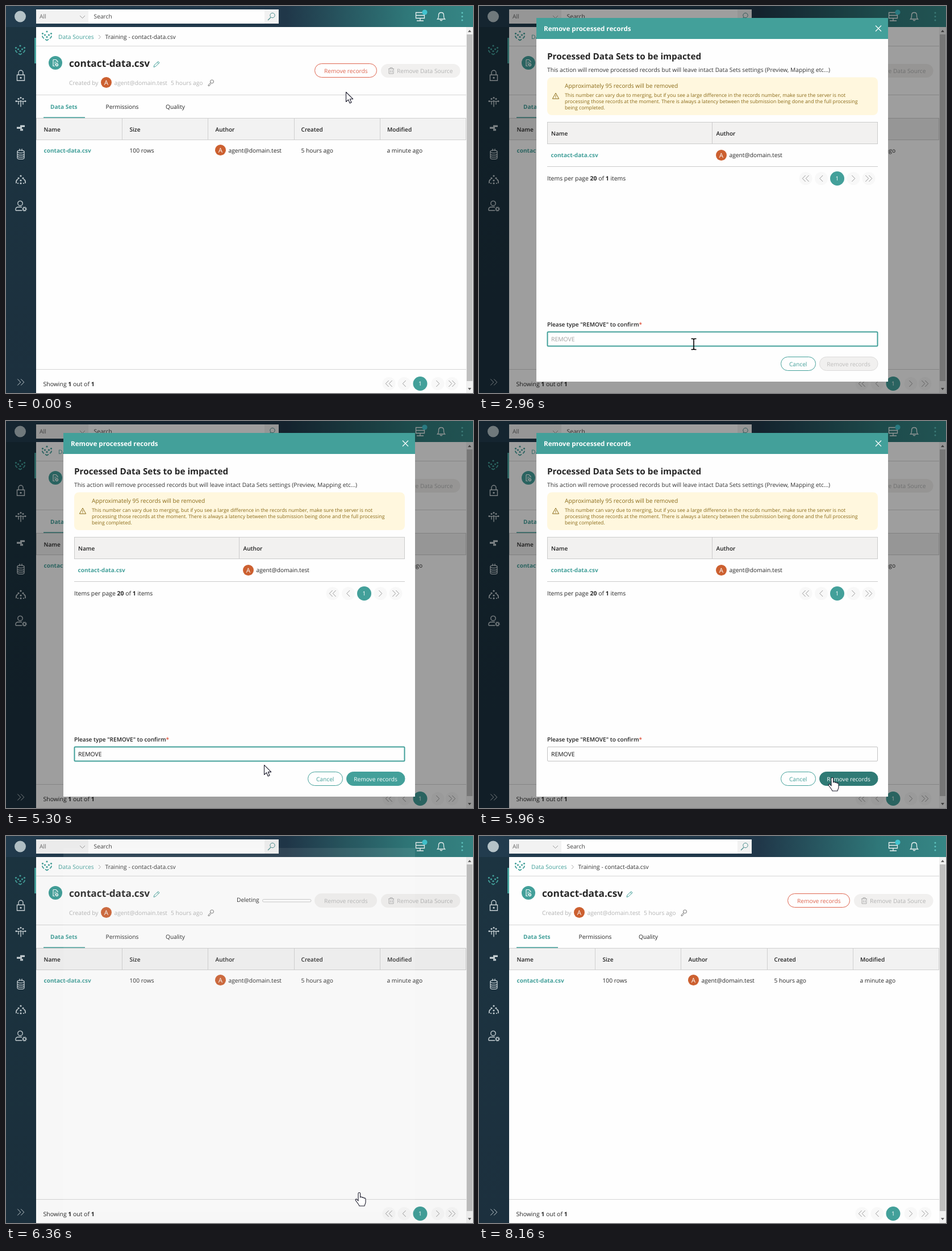
An HTML page for the animation above (8530 ms loop, 822 by 681 pixels).

```html
<!DOCTYPE html>
<html lang="en">
<head>
<meta charset="utf-8">
<title>Remove processed records</title>
<style>
  html, body { margin: 0; width: 100%; height: 100%; overflow: hidden; background: #fefefe; }
  svg { display: block; width: 100%; height: 100%; }
  text { font-family: "Open Sans", "Noto Sans", sans-serif; text-rendering: geometricPrecision; white-space: pre; }
</style>
</head>
<body>
<svg id="stage" viewBox="0 0 822 681" xmlns="http://www.w3.org/2000/svg"></svg>
<script>
const LOOP = 8530;
const TEAL = '#43a09a', INK = '#262626', GREY = '#b3b3b3', RED = '#de654f', RUST = '#cc6030', PALE = '#c3cdd1', OFF = '#f1f0ef';
const MAIL = 'agent@domain.test';

// Drawing helpers, each returning SVG markup
const text = (x, y, s, fill = INK, size = 10.25, weight = 400, more = '') =>
  `<text x="${x}" y="${y}" fill="${fill}" font-size="${size}" font-weight="${weight}" ${more}>${s}</text>`;
const semi = (x, y, s, more) => text(x, y, s, '#222', 10.1, 600, more);
const bold = (x, y, s, fill = INK, size = 10.1) => text(x, y, s, fill, size, 700);
const mid = (x, y, s, fill, more = '') => text(x, y, s, fill, 10.2, 400, 'text-anchor="middle" ' + more);
const rect = (x, y, w, h, fill, more = '') => `<rect x="${x}" y="${y}" width="${w}" height="${h}" fill="${fill}" ${more}/>`;
const line = (d, stroke = '#d6d6d6', w = 1, more = '') => `<path d="${d}" fill="none" stroke="${stroke}" stroke-width="${w}" ${more}/>`;
const dot = (x, y, r, fill, more = '') => `<circle cx="${x}" cy="${y}" r="${r}" fill="${fill}" ${more}/>`;
const at = (x, y, s) => `<g transform="translate(${x} ${y})">${s}</g>`;
const dots = (points, r, fill) => points.map(([x, y]) => dot(x, y, r, fill)).join('');
const chevron = (x, y, dir, count = 1, stroke = '#9a9a9a') =>
  Array.from({ length: count }, (_, i) => {
    const cx = x + (i - (count - 1) / 2) * 6;
    return line(`M${cx - 2.7 * dir} ${y - 5.5}l${5.4 * dir} 5.5l${-5.4 * dir} 5.5`, stroke);
  }).join('');
const avatar = (x, y) => dot(x, y, 9.5, RUST) + mid(x, y + 4.2, 'A', '#fff', 'style="font-size:11.5px"');
const pager = (x, y, [first, prev, next, last]) =>
  [first, prev, next, last].map(p => dot(p, y, 11.5, '#f8f8f8')).join('') +
  chevron(first, y, -1, 2) + chevron(prev, y, -1) + dot(x, y, 12.5, TEAL) +
  mid(x, y + 3.7, '1', '#fff') + chevron(next, y, 1) + chevron(last, y, 1, 2);
const strong = s => `<tspan font-weight="700">${s}</tspan>`;

// Icons, centred on the origin
const sourceIcon = dots([[0, -7], [-7.5, -3.5], [7.5, -3.5], [-3.5, -1], [3.5, -1], [0, 2.5]], 1.6, TEAL) +
  line('M-8 .5Q-8 3.5-5 5M8 .5Q8 3.5 5 5M-3 6.5L0 8.5 3 6.5', TEAL, 1.8);
const sideIcons = [
  sourceIcon,
  line('M-6.5-1.5h13v10h-13zM-4-1.5v-4a4 4 0 0 1 8 0v4', PALE, 1.4) + dot(0, 3.5, 1.6, PALE),
  line('M0-3V9M-8-1H8M-4-1V5M4-1V5', PALE, 1.4) + dots([[0, -7], [-4, -5], [4, -5], [-8, -1], [8, -1]], 1.5, PALE),
  line('M-1-3H7M-7 0H2M-1 3.5H4', PALE, 3.2),
  line('M-6-4V7c0 3 12 3 12 0V-4M-6 0c0 3 12 3 12 0M-6 3.5c0 3 12 3 12 0M-2-9v4M2-9v4', PALE, 1.3) +
    `<ellipse cy="-4" rx="6" ry="2.4" fill="none" stroke="${PALE}" stroke-width="1.3"/>`,
  dots([[0, -7], [-4, -3], [4, -3], [0, 1], [0, 6]], 1.6, PALE) + line('M-8 6V3Q-8 0-5-1M8 6V3Q8 0 5-1M-5 7V5M5 7V5', PALE, 1.7),
  dot(-1, -4.5, 4.2, 'none', `stroke="${PALE}" stroke-width="1.4"`) + line('M-9 8V6Q-9 2-4 2H2M-9 8H2', PALE, 1.4) +
    dot(6.5, 5.5, 2.4, 'none', `stroke="${PALE}" stroke-width="1.4"`) + dot(6.5, 5.5, 3.6, 'none', `stroke="${PALE}" stroke-width="1.3" stroke-dasharray="1.4"`)
];

const chrome =
  rect(0, 0, 822, 37, 'url(#bar)') + rect(0, 37, 53, 644, 'url(#side)') + dot(25, 18.5, 10, '#b5c3c8') +
  rect(53, 6, 92, 25, '#f2f2f2') + rect(145, 6, 310, 25, '#fefefe') + rect(455, 6, 25, 25, '#f2f2f2') +
  text(59, 22, 'All', '#666') + line('M130 17l4.5 4.5 4.5-4.5', '#999') + text(154.5, 22, 'Search', '#444') +
  dot(469, 16.5, 4.2, 'none', 'stroke="#4a8d8d"') + line('M466 20l-5 5', '#4a8d8d', 1.2) +
  line('M721.5 11.5h15v5h-15zM721.5 16.5h15v5h-15zM729 22v4M723 26h12', '#e8f0f0', 1.3) + dot(737, 11, 4.6, '#42c4d0') +
  line('M759.5 23h13q-2-2-2-5v-2q0-4.5-4.5-4.5t-4.5 4.5v2q0 3-2 5zM764 24.5q2 2.5 4 0', '#e8f0f0', 1.3) +
  dots([[803, 12], [803, 18.5], [803, 25]], 1.5, '#5fc4c0') +
  sideIcons.map((s, i) => at(i ? 26 : 25, 77 + 45.8 * i, s)).join('') +
  rect(50, 56, 3, 45, TEAL) + chevron(26, 662, 1, 2, PALE) +
  rect(810, 37, 12, 644, '#f1f1f1') + rect(811, 50, 10, 610, '#bfbfbf') +
  '<path d="M813 46l3-4 3 4zM813 672l3 4 3-4z" fill="#666"/>';

const columns = [['Name', 66.5], ['Size', 217.5], ['Author', 368.5], ['Created', 519.5], ['Modified', 671]];
const page =
  rect(53, 37, 757, 644, '#fefefe') + at(72, 52, sourceIcon) + text(92, 58, 'Data Sources', TEAL) +
  line('M163 51l3.5 3.5-3.5 3.5', '#aaa') + text(174.5, 58, 'Training - contact-data.csv', '#333') +
  line('M53 70.5H810M53 156.5H810M53 639.5H810') +
  dot(87, 100, 12, TEAL) + line('M83 94.5h5l3 3v2M83 94.5v11h3M85 99h4M85 102h2', '#fff', 1.1) +
  dot(89.5, 103.5, 2, 'none', 'stroke="#fff" stroke-width="1.3"') +
  bold(111, 107, 'contact-data.csv', INK, 17.25) + line('M260 107.5l1-3.5 7-6.5 2 2.5-7 6.5zM266 99l2.3 2.5', TEAL) +
  text(111, 138.6, 'Created by', GREY) + avatar(176.5, 134.5) + text(190.5, 138.6, MAIL, GREY) + text(290, 138.6, '5 hours ago', GREY) +
  dot(362.5, 133, 3, 'none', 'stroke="#777"') + line('M360 135l-4 4v1.5h2l1-2 2-1.5', '#777') +
  bold(78, 181.2, 'Data Sets', TEAL) + rect(66, 195.5, 73, 2, TEAL) + text(175.5, 181.2, 'Permissions') + text(281, 181.2, 'Quality') +
  rect(53.5, 197.5, 756, 38, '#f2f2f2', 'stroke="#cfcfcf"') +
  line('M204.5 197V235M355.5 197V235M507.5 197V235M658.5 197V235', '#cfcfcf') +
  columns.map(([s, x]) => semi(x, 220.6, s)).join('') +
  bold(66.5, 257.8, 'contact-data.csv', TEAL) + text(217.5, 257.8, '100 rows') + avatar(377.5, 253.5) + text(391.5, 257.8, MAIL) +
  text(519.5, 257.8, '5 hours ago') + text(670.5, 257.8, 'a minute ago') +
  text(65.5, 668.5, `Showing ${strong(1)} out of ${strong(1)}`, INK, 10.45) + pager(729, 664.5, [674, 701, 760, 785]) +
  rect(660, 102, 139.5, 24, OFF, 'rx="12"') + text(688, 117.7, 'Remove Data Source', GREY, 10.2) +
  line('M673 110.5h10M676 110v-1.5h4v1.5M674 111v8h8v-8M676.5 113v4M679.5 113v4', '#aaa') +
  rect(543.5, 101.5, 109, 24, 'none', 'id="open" rx="12"') + mid(598.3, 117.7, 'Remove records', RED, 'id="openText"') +
  `<g id="deleting">${text(406, 116.4, 'Deleting')}${rect(451.5, 111.5, 85.5, 4.5, '#fefefe', 'rx="2.2" stroke="#c8c8c8"')}` +
  `${rect(452, 112, 0, 3.6, TEAL, 'id="progress" rx="1.8"')}</g>`;

const BROWN = '#8a6a17';
const notice = [
  'This number can vary due to merging, but if you see a large difference in the records number, make sure the server is not',
  'processing those records at the moment. There is always a latency between the submission being done and the full processing',
  'being completed.'
];
const dialog =
  rect(101, 21, 619, 37, TEAL) + bold(114, 44.2, 'Remove processed records', '#fff', 11.6) +
  line('M698 34.5l10 10M708 34.5l-10 10', '#fff', 1.2) +
  bold(120, 94.3, 'Processed Data Sets to be impacted', INK, 15.3) +
  text(120, 116.2, 'This action will remove processed records but will leave intact Data Sets settings (Preview, Mapping etc...)', '#333') +
  rect(120, 125.5, 582, 66.5, '#fff7de', 'rx="8"') + line('M135 153.2l5.6 10h-11.2zM135 156.8v3.4M135 161v1', BROWN) +
  text(151, 144.3, 'Approximately 95 records will be removed', BROWN, 10.2) +
  notice.map((s, i) => text(151, 159.6 + 11 * i, s, BROWN, 8.78)).join('') +
  rect(120.5, 204.5, 581, 38, '#f2f1f0', 'stroke="#cbcbcb"') + line('M410.5 204V242M120 282.5H702', '#cbcbcb') +
  semi(127, 227.8, 'Name') + semi(417.5, 227.8, 'Author') +
  bold(126.5, 266.2, 'contact-data.csv', TEAL) + avatar(426.5, 262.5) + text(440.5, 266.2, MAIL) +
  text(120, 307.3, `Items per page ${strong(20)} of ${strong(1)} items`, INK, 10.45) + pager(630.5, 303.5, [575, 602.5, 659, 686]) +
  semi(120, 564.2, 'Please type "REMOVE" to confirm<tspan fill="#e0503a">*</tspan>') +
  rect(120.5, 573.5, 581, 25, '#fefefe', 'id="field" rx="1.5"') +
  text(127, 589.8, '', INK, 10.4, 400, 'id="typed"') + rect(127, 578, 1, 15, '#111', 'id="caret"') +
  rect(531.5, 617.5, 61, 24, '#fefefe', `rx="12" stroke="${TEAL}"`) + mid(561.7, 633.8, 'Cancel', TEAL) +
  rect(599.5, 617.5, 102.5, 24, OFF, 'id="confirm" rx="12"') + mid(650.5, 633.8, 'Remove records', GREY, 'id="confirmText"');

const cursors =
  '<g id="cursor" fill="#fff" stroke="#1c1c2c" stroke-width="1.1" stroke-linejoin="round">' +
  '<path id="arrow" d="M.5 .5V17.5L4.5 13.8 7.2 20 10 18.8 7.4 12.7H12.7Z"/>' +
  '<path id="hand" d="M-2 15V2.3a1.8 1.8 0 0 1 3.6 0V9C2 7.5 5 7.5 5 9.5 6 8.3 8 8.8 8.2 10.5 9.5 9.5 11 10.5 11 12V17C11 20 9.5 21 9 24H0C-1 21-4 18-6 15-8 12.5-5.5 11-4 12.8Z"/>' +
  '<path id="beam" d="M-4.5-9.5H-1.5L0-8.5 1.5-9.5H4.5M0-8.5V8.5M-4.5 9.5H-1.5L0 8.5 1.5 9.5H4.5" fill="none" stroke="#000" stroke-width="1.6"/></g>';

const gradient = (id, dir, stops) => `<linearGradient id="${id}" x1="0" y1="0" ${dir}="1" ${dir === 'y2' ? 'x2="0"' : ''}>` +
  stops.map(([o, c]) => `<stop offset="${o}" stop-color="${c}"/>`).join('') + '</linearGradient>';

const $ = id => document.getElementById(id);
$('stage').innerHTML =
  `<defs>${gradient('bar', 'x2', [[0, '#223c4e'], [.6, '#203749'], [.86, '#2f7879'], [1, '#368685']])}` +
  `${gradient('side', 'y2', [[0, '#1c3441'], [1, '#1c303e']])}</defs>` +
  page + chrome + rect(0, 0, 822, 681, '#000', 'id="shade"') +
  `<g id="modal">${rect(101, 21, 619, 640, '#fefefe')}<g id="content">${dialog}</g></g>` + cursors;

const set = (id, attrs) => { for (const k in attrs) $(id).setAttribute(k, attrs[k]); };
const show = (id, on) => set(id, { visibility: on ? 'visible' : 'hidden' });
const ramp = (t, a, b) => Math.min(1, Math.max(0, (t - a) / (b - a)));

// Pointer stops: time, x, y
const path = [
  [70, 598, 151], [600, 598, 113], [1730, 598, 113], [2230, 378, 595], [5030, 378, 595],
  [5900, 622, 627], [6500, 622, 627], [7060, 551, 601], [7600, 804, 648]
];
const keys = [2430, 3230, 3430, 3630, 3830, 4030, 4260];

function pointer(t) {
  let [, x, y] = path[0];
  for (let i = 1; i < path.length; i++) {
    const [a, x0, y0] = path[i - 1], [b, x1, y1] = path[i];
    if (t >= a) {
      const u = ramp(t, a, b);
      x = x0 + (x1 - x0) * u;
      y = y0 + (y1 - y0) * u;
    }
  }
  return [x, y];
}

function draw(t) {
  const [x, y] = pointer(t);
  const overOpen = t < 1400 && y < 126;
  const overConfirm = t > 5030 && t < 6530 && x > 599;
  const overField = t > 1730 && t < 5900 && y > 573 && y < 598;
  const kind = overOpen || overConfirm ? 'hand' : overField ? 'beam' : 'arrow';
  for (const k of ['arrow', 'hand', 'beam']) show(k, k === kind && t < 7600);
  set('cursor', { transform: `translate(${x} ${y})` });

  const deleting = t >= 6200 && t < 8160;
  const pressed = t >= 760 && t < 1030;
  set('open', {
    fill: deleting ? OFF : overOpen ? (pressed ? '#c9533e' : RED) : '#fefefe',
    stroke: deleting ? OFF : RED
  });
  set('openText', { fill: deleting ? GREY : overOpen ? '#fff' : RED });
  show('deleting', deleting);
  set('progress', { width: 85 * ramp(t, 7730, 7830) });

  const u = ramp(t, 6220, 6390);
  const fade = t < 1030 ? 0 : 1 - u * u * (3 - 2 * u);
  set('shade', { opacity: .38 * fade });
  set('modal', { opacity: fade });
  set('content', { display: t >= 1030 && t < 6200 ? 'inline' : 'none' });

  const focused = t >= keys[0] && t < 5900;
  const count = Math.max(0, keys.filter(k => k <= t).length - 1);
  set('field', { stroke: focused ? TEAL : '#c2c2c2', 'stroke-width': focused ? 2 : 1 });
  $('typed').textContent = 'REMOVE'.slice(0, count || 6);
  set('typed', { fill: count ? '#111' : '#a0a0a0' });
  const lit = focused && (t - keys[count]) % 1060 < 530;
  set('caret', { opacity: lit ? 1 : 0, x: 127 + (count && lit ? Math.round($('typed').getComputedTextLength()) : 0) });

  const ready = t >= 4260;
  const fill = !ready ? OFF : t >= 5900 && t < 6000 ? '#2f7a75' : overConfirm ? '#388d87' : TEAL;
  set('confirm', { fill, stroke: ready ? fill : '#dcdbda' });
  set('confirmText', { fill: ready ? '#fff' : '#bdbcbb' });
}

const start = performance.now();
function tick(now) {
  draw(Math.max(0, now - start) % LOOP);
  requestAnimationFrame(tick);
}
draw(0);
requestAnimationFrame(tick);
</script>
</body>
</html>
```
